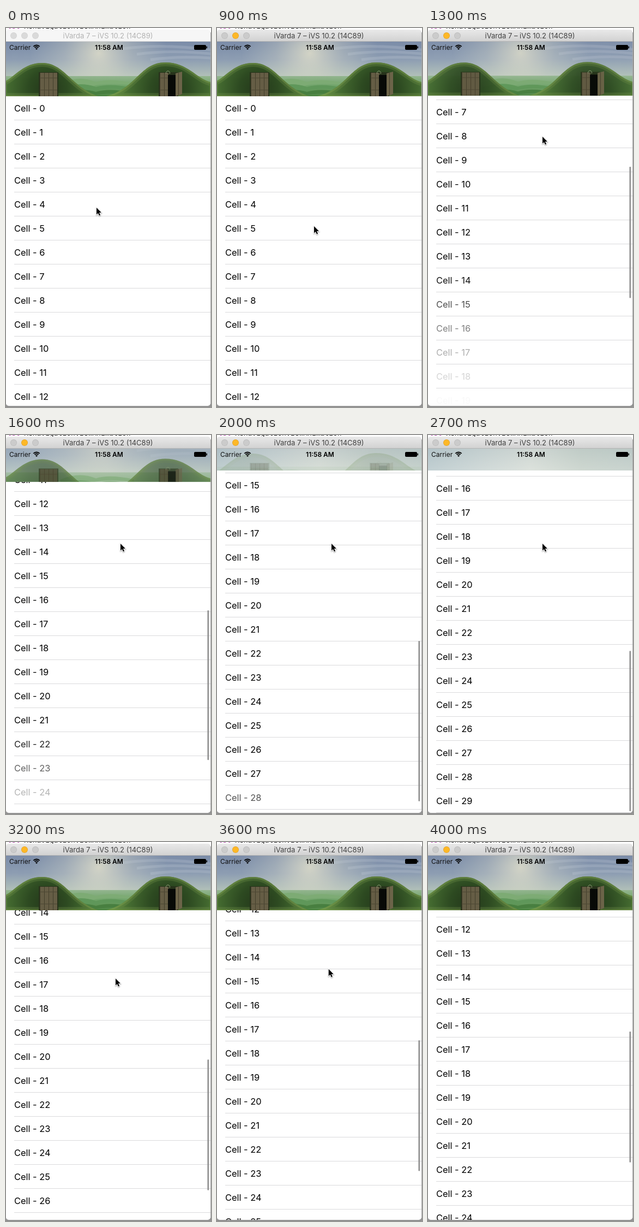
Write an HTML page with a canvas that moves like this. It is 376x694 px and loops after 4.1 s.

```html
<!DOCTYPE html>
<html lang="en">
<head>
<meta charset="utf-8">
<title>Collapsing header</title>
<style>
  html, body { margin: 0; width: 376px; height: 694px; overflow: hidden; background: #fff; }
  canvas { display: block; }
</style>
</head>
<body>
<canvas id="stage" width="376" height="694"></canvas>
<script>
const ctx = document.getElementById('stage').getContext('2d');
const LOOP = 4100, STEP = 100;
const TOP = 25, BOTTOM = 692, WIDTH = 375, ROW = 44, ROWS = 30;
const TALL = 125, SHORT = 65, MAX_SCROLL = 753, CONTENT = ROW * ROWS;
const FONT = 'Inter, Roboto, sans-serif';
const MONO = '"DejaVu Sans Mono", monospace';

const progress = (t, start, length) => Math.min(1, Math.max(0, (t - start) / length));
const smooth = u => u * u * (3 - 2 * u);
const mix = (a, b, u) => a + (b - a) * u;
// How far a drag has gone: it speeds up until the release.
const drag = (t, start, end) => progress(t, start, end - start) ** 2;
const decay = (t, start) => Math.exp((start - t) / 500);

function scrollAt(t) {
  if (t < 1200) return 172 * drag(t, 955, 1200);
  if (t < 2165) return 850 - 670 * decay(t, 1200);
  if (t < 2780) return MAX_SCROLL + 0.194 * (t - 2165) * Math.exp((2165 - t) / 80);
  if (t < 3014) return MAX_SCROLL - 52 * drag(t, 2780, 3014);
  return 484.6 + 216.4 * decay(t, 3014);
}

function headerAt(t) {
  const closed = smooth(progress(t, 1250, 580)) - smooth(progress(t, 2780, 430));
  return mix(TALL, SHORT, closed);
}

function pointerAt(t) {
  if (t < 900) {
    const u = smooth(progress(t, 0, 600));
    return [mix(166, 178, u), mix(329, 363, u)];
  }
  if (t < 2700) {
    const u = drag(t, 955, 1200);
    return [mix(178, 210, u), mix(363, 199, u)];
  }
  const u = drag(t, 2780, 3014), away = progress(t, 3500, 400) ** 2;
  return [mix(210, 201, u) + 60 * away, mix(199, 250, u) - 275 * away];
}

// Time at which each row first comes up from the lower edge.
const shownAt = Array.from({ length: ROWS }, (_, row) => {
  const needed = TALL + row * ROW - BOTTOM;
  if (needed < 0) return -1000;
  let t = 0;
  while (t < 2400 && scrollAt(t) < needed) t += 5;
  return t;
});

function rect(x, y, w, h, color) {
  ctx.fillStyle = color;
  ctx.fillRect(x, y, w, h);
}

function shape(d, color) {
  ctx.fillStyle = color;
  ctx.fill(new Path2D(d));
}

function line(d, color, width) {
  ctx.strokeStyle = color;
  ctx.lineWidth = width;
  ctx.stroke(new Path2D(d));
}

function rounded(x, y, w, h, r, color) {
  ctx.beginPath();
  ctx.roundRect(x, y, w, h, r);
  ctx.fillStyle = color;
  ctx.fill();
}

function disc(x, y, r, color) {
  ctx.beginPath();
  ctx.arc(x, y, r, 0, 2 * Math.PI);
  ctx.fillStyle = color;
  ctx.fill();
}

function text(s, x, y, size, color = '#000', align = 'left', weight = 400, family = FONT) {
  ctx.font = `${weight} ${size}px ${family}`;
  ctx.textAlign = align;
  ctx.fillStyle = color;
  ctx.fillText(s, x, y);
}

function fade(gradient, colors) {
  colors.forEach((c, i) => gradient.addColorStop(i / (colors.length - 1), c));
  return gradient;
}
const vertical = (y0, y1, ...colors) => fade(ctx.createLinearGradient(0, y0, 0, y1), colors);
const horizontal = (...colors) => fade(ctx.createLinearGradient(0, 0, WIDTH, 0), colors);
const glow = (x, y, r, ...colors) => fade(ctx.createRadialGradient(x, y, 0, x, y, r), colors);

// A grassy mound: dark around its door, with a soft bright rim.
function hill(edge, doorX) {
  const mound = new Path2D(edge);
  ctx.save();
  ctx.clip(mound);
  rect(0, 60, WIDTH, 70, glow(doorX, 112, 105, '#23371a', '#2d4a21', '#42682f', '#5b8a3f'));
  line(edge, 'rgba(120,150,75,.25)', 14);
  line(edge, 'rgba(135,165,85,.35)', 6);
  ctx.restore();
}

function planks(x, y, w, h) {
  rect(x, y, w, h, '#655d45');
  for (let i = x; i < x + w; i += 8) rect(i, y, 1, h, '#443f2c');
  rect(x, y + 9, w, 1, '#4d4733');
  rect(x, y + 31, w, 1, '#4d4733');
}

function landscape() {
  rect(0, 0, WIDTH, 130, vertical(25, 90, '#7b8ca8', '#8d9db2', '#b3c2b9'));
  rect(0, 0, WIDTH, 130, glow(170, 46, 125, 'rgba(236,232,206,.75)', 'rgba(222,222,204,.3)', 'rgba(215,220,205,0)'));
  for (let i = 0; i < 3; i++) {
    line(`M${215 + i * 25} ${38 + i * 10}q70 -10 160 2`, 'rgba(200,208,218,.22)', 5);
  }
  rect(0, 88, WIDTH, 40, vertical(88, 125, '#93b58f', '#6fa368', '#4c8442'));
  for (let i = 0; i < 3; i++) {
    shape(`M100 ${101 + i * 9}q35 -${15 - i * 2} 65 -2q25 -8 70 2v4q-50 -6 -75 1q-20 -4 -60 1z`,
      ['#7dab74', '#5f975a', '#487f40'][i]);
  }
  hill('M-5 99C15 92 30 64 66 64C108 64 118 108 172 126H-5Z', 76);
  hill('M180 126C240 112 245 63 292 63C336 63 350 96 380 100V126Z', 300);
  rect(60, 81, 36, 44, '#27331b');
  planks(62, 82, 32, 43);
  rect(280, 81, 36, 44, '#27331b');
  planks(282, 82, 16, 43);
  rect(297, 86, 15, 39, '#080a07');
  shape('M311 83L323 80V121L311 125Z', '#6c6449');
  rect(316, 82, 1, 41, '#45402d');
  line('M294 84a3.5 3.5 0 1 1 6 0', '#8d9b75', 1);
}

function header(t, bottom) {
  const washed = progress(t, 1250, 850) * (1 - progress(t, 2780, 330));
  ctx.save();
  ctx.beginPath();
  ctx.rect(0, TOP, WIDTH, bottom - TOP);
  ctx.clip();
  rect(0, TOP, WIDTH, 100, horizontal('#b8c8cd', '#cbd5d5', '#dbe0da', '#c8d2ca', '#c2cec9'));
  rect(0, TOP, WIDTH, 100, vertical(TOP, SHORT, 'rgba(165,182,186,.25)', 'rgba(225,232,228,.25)'));
  ctx.globalAlpha = 1 - washed;
  ctx.translate(0, (bottom - TALL) / 2);
  landscape();
  ctx.restore();
}

function list(t, scroll) {
  for (let row = 0; row < ROWS; row++) {
    const y = Math.round(TALL + row * ROW - scroll);
    if (y < -ROW || y > BOTTOM) continue;
    ctx.globalAlpha = smooth(progress(t, shownAt[row], 250));
    text(`Cell - ${row}`, 15, y + 28, 16.4);
    ctx.globalAlpha = 1;
    rect(15, y + ROW - 1, WIDTH - 15, 1, '#dadadc');
  }
}

function scrollbar(t, scroll, top) {
  const track = BOTTOM - top;
  const y = top + (scroll + top - TALL) / CONTENT * track;
  const end = Math.min(BOTTOM - 2, y + track * track / CONTENT - 3);
  ctx.globalAlpha = progress(t, 955, 100);
  rounded(369.5, y + 1, 2.5, end - y - 1, 1.25, '#8c8c8c');
  ctx.globalAlpha = 1;
}

function statusBar() {
  text('Carrier', 6, 39.5, 12, '#101010');
  text('11:58 AM', 189, 39.5, 12, '#000', 'center', 600);
  ctx.strokeStyle = '#000';
  ctx.lineWidth = 1.8;
  for (const r of [5, 8]) {
    ctx.beginPath();
    ctx.arc(56, 39.5, r, -2.36, -0.78);
    ctx.stroke();
  }
  shape('M56 40L53.8 37.6Q56 35.8 58.2 37.6Z', '#000');
  rounded(345, 31, 22, 9, 2, '#000');
  rounded(367.5, 33.5, 1.5, 4, 0.7, '#000');
}

function titleBar(active) {
  rect(0, 3, WIDTH, 22, active ? vertical(3, 25, '#e9e9e9', '#d1d1d1') : '#f6f6f6');
  rect(0, 24, WIDTH, 1, active ? '#b4b4b4' : '#d6d6d6');
  const idle = active ? '#cbcbcb' : '#dadada';
  [idle, active ? '#fdb827' : idle, idle].forEach((color, i) => {
    disc(14 + i * 20, 14, 6, active ? (i === 1 ? '#e0a02a' : '#b9b9b9') : '#d0d0d0');
    disc(14 + i * 20, 14, 5.3, color);
  });
  text('iVarda 7 – iVS 10.2 (14C89)', 187, 19, 13, active ? '#404040' : '#b2b2b2', 'center');
}

function pointer(x, y) {
  ctx.save();
  ctx.translate(x, y);
  ctx.scale(0.86, 0.86);
  const arrow = 'M0 0V14.5L3.4 11.5L5.8 17L8.2 16L5.8 10.6H10.4Z';
  ctx.shadowColor = 'rgba(0,0,0,.4)';
  ctx.shadowBlur = 2;
  ctx.shadowOffsetY = 1;
  line(arrow, '#fff', 2);
  ctx.shadowColor = 'transparent';
  shape(arrow, '#000');
  ctx.restore();
}

function draw(t) {
  const scroll = scrollAt(t), bottom = headerAt(t);
  rect(0, 0, 376, 694, '#fff');
  text('let', 2, 1, 13, '#a0329a', 'left', 400, MONO);
  text('RenavigationViewAnimation', 33, 1, 13, '#000', 'left', 400, MONO);
  rect(375, 8, 1, 686, '#a5a5a5');
  rect(0, 688, 376, 6, '#929292');

  ctx.save();
  ctx.beginPath();
  ctx.roundRect(0, 3, WIDTH, BOTTOM - 3, 5);
  ctx.clip();
  rect(0, 0, WIDTH, BOTTOM, '#fff');
  list(t, scroll);
  scrollbar(t, scroll, bottom);
  header(t, bottom);
  statusBar();
  titleBar(t >= 800);
  ctx.restore();
  pointer(...pointerAt(t));
}

function tick() {
  const t = performance.now() % LOOP;
  draw(Math.floor(t / STEP) * STEP);
  requestAnimationFrame(tick);
}
tick();
</script>
</body>
</html>
```
